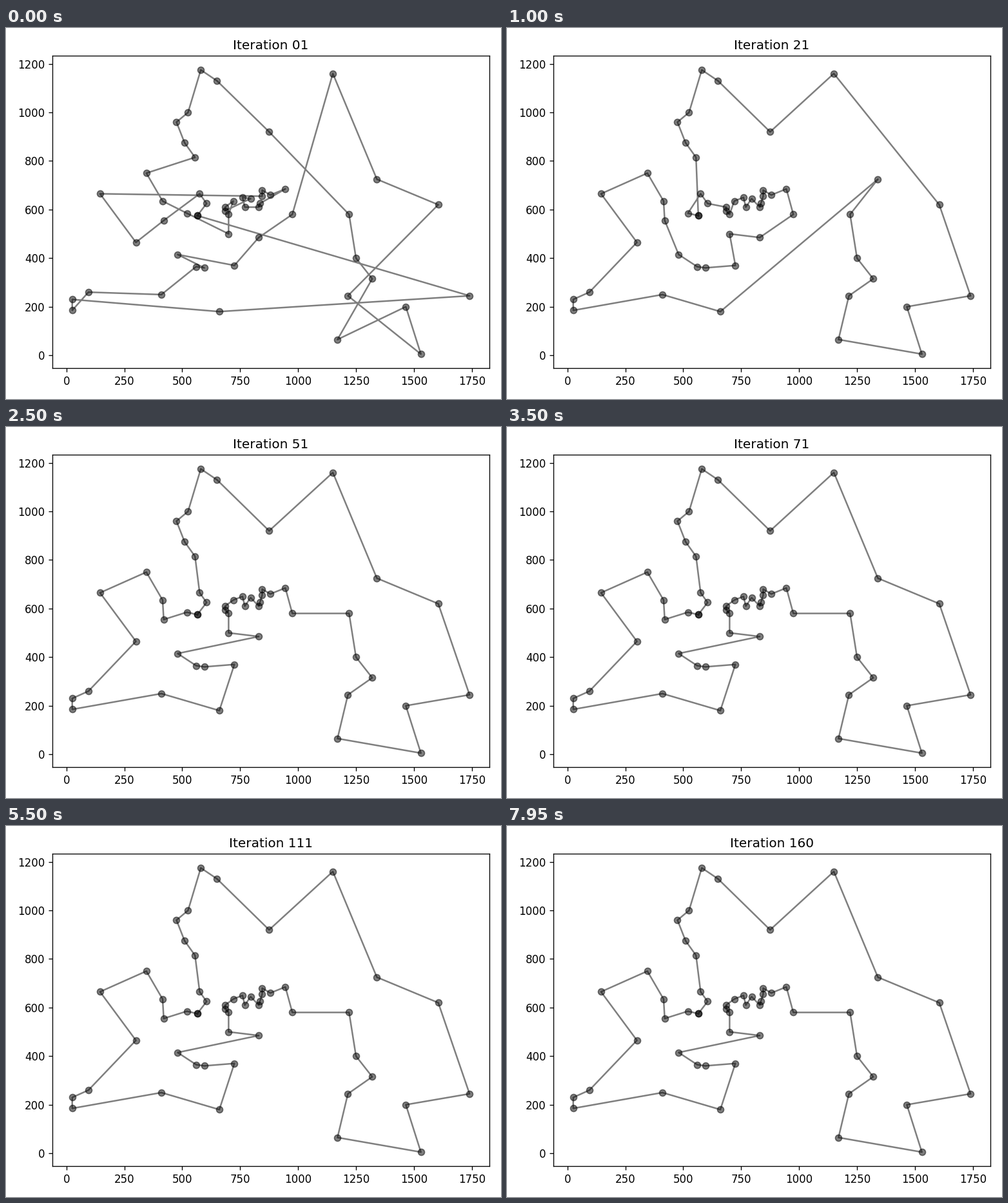
A matplotlib script that plays this animation: 768x576 px, repeating every 8 s.

```python
import matplotlib.pyplot as plt
import numpy as np
from matplotlib.animation import FuncAnimation

FRAMES, INTERVAL = 160, 50

# Cities, listed in the order of the best route
CITIES = np.array([
    (565, 575), (520, 585), (420, 555), (415, 635), (345, 750), (145, 665),
    (300, 465), (95, 260), (25, 230), (25, 185), (410, 250), (660, 180),
    (725, 370), (595, 360), (560, 365), (480, 415), (830, 485), (700, 500),
    (700, 580), (685, 595), (685, 610), (720, 635), (760, 650), (770, 610),
    (795, 645), (830, 610), (835, 625), (845, 655), (845, 680), (880, 660),
    (945, 685), (975, 580), (1220, 580), (1250, 400), (1320, 315),
    (1215, 245), (1170, 65), (1530, 5), (1465, 200), (1740, 245),
    (1605, 620), (1340, 725), (1150, 1160), (875, 920), (650, 1130),
    (580, 1175), (525, 1000), (475, 960), (510, 875), (555, 815),
    (575, 665), (605, 625),
])

# Iteration at which each route becomes the best; "a-b" is a run of cities
ROUTES = {
    1: "0 51 50 2 6 5 27-30 26 25 23 22 24 19-21 18 17 1 3 4 49-43 32-34 "
       "36 38 37 35 40-42 31 16 12 15 13 14 10 7 9 8 11 39",
    4: "0-1 50-51 20-18 21-31 16-17 12-15 10 7-9 6 3 2 5 4 48-49 47-42 "
       "37 35-32 41-38 36 11",
    14: "0-1 50-51 20-18 21-31 16-17 12-15 2-11 41 32-40 42-49",
    24: "0-1 50-51 20-18 21-31 16-17 12-15 2-11 32-49",
    34: "0-51",
}


def closed_path(route):
    order = []
    for run in route.split():
        ends = [int(n) for n in run.split("-")]
        a, b = ends[0], ends[-1]
        step = 1 if b >= a else -1
        order.extend(range(a, b + step, step))
    return CITIES[order + order[:1]]


PATHS = {start: closed_path(route) for start, route in ROUTES.items()}

fig, ax = plt.subplots(figsize=(6.4, 4.8), dpi=120)
line, = ax.plot(*PATHS[1].T, "ko-", alpha=0.5)
title = ax.set_title("Iteration 01")
fig.tight_layout()


def update(frame):
    iteration = frame + 1
    best = max(start for start in PATHS if start <= iteration)
    line.set_data(*PATHS[best].T)
    title.set_text(f"Iteration {iteration:02d}")
    return line, title


anim = FuncAnimation(fig, update, frames=FRAMES, interval=INTERVAL,
                     repeat=True, repeat_delay=0)
plt.show()
```
